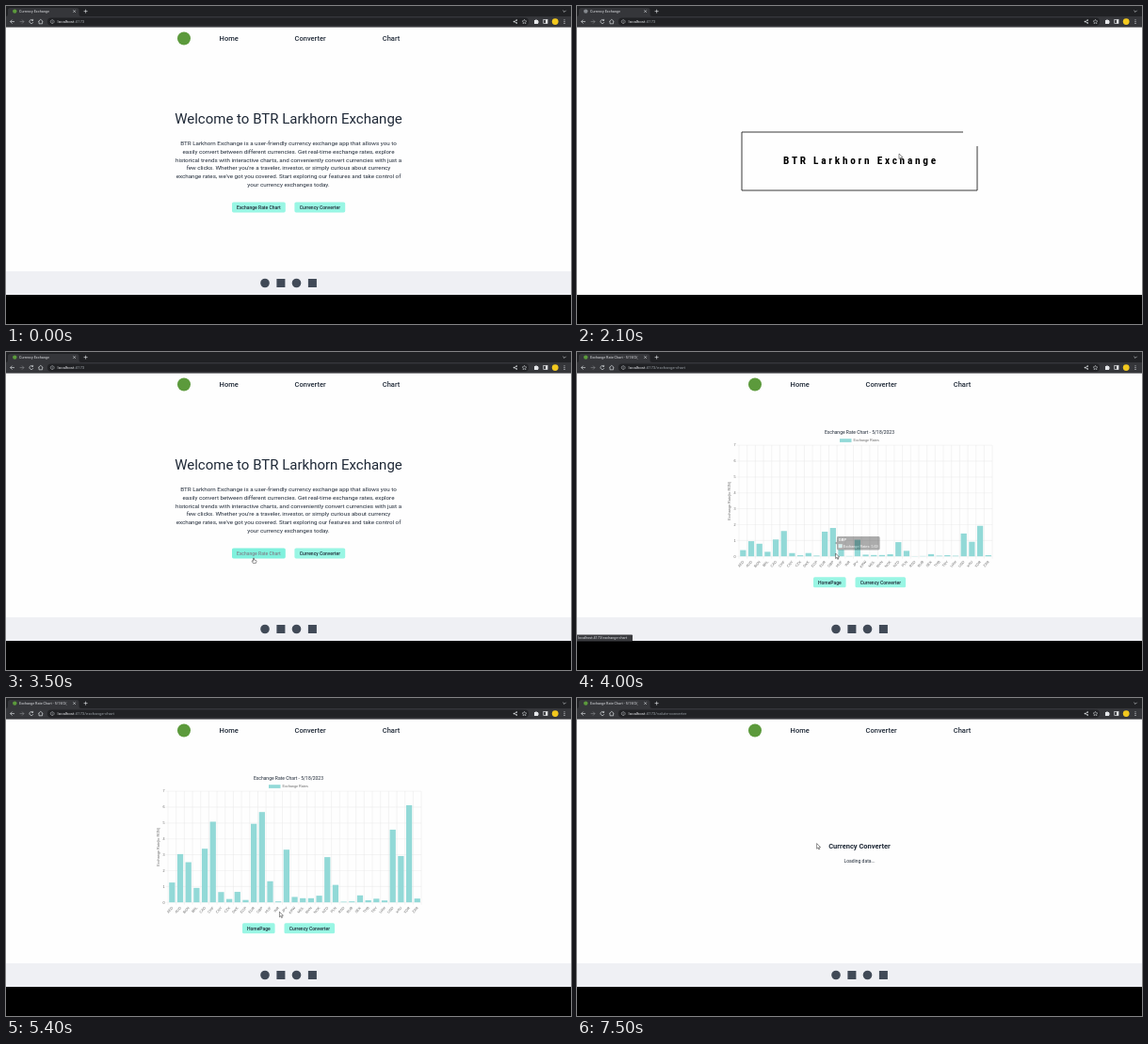
Animation, 600 px wide and 338 px high, one loop 8 s. Source, as an HTML page:

```html
<!DOCTYPE html>
<html lang="en">
<head>
<meta charset="utf-8">
<title>Currency Exchange</title>
<style>
html, body { margin: 0; width: 100%; height: 100%; overflow: hidden; background: #fff; }
svg { display: block; width: 600px; height: 338px; }
text { font-family: Roboto, sans-serif; fill: #1f2937; white-space: pre; }
.mid { text-anchor: middle; }
.nav { font-size: 7.5px; font-weight: 500; }
.body { font-size: 6.25px; }
.btn { font-size: 5px; font-weight: 500; }
.plot text { font-family: "Liberation Sans", Arial, sans-serif; font-size: 3.75px; fill: #666; }
.plot .title { font-family: Roboto, sans-serif; font-size: 5px; fill: #1f2937; }
.tip text { fill: #fff; }
.splash text { font: 700 11.25px "Roboto Condensed", Roboto, sans-serif; font-stretch: 75%; letter-spacing: 2.75px; fill: #000; }
.tab { font-size: 3.75px; fill: #dfe1e5; }
.url { font-size: 4.375px; fill: #e8eaed; }
.url tspan { fill: #9aa0a6; }
.line { fill: none; stroke: #d5d8dc; stroke-width: .7; }
</style>
</head>
<body>
<svg id="stage" viewBox="0 0 600 338"></svg>
<script>
const LOOP = 8000, STEP = 100;
const BRAND = "BTR Larkhorn Exchange";
const SPLASH_ON = 1900, HOME_BACK = 2700, CHART_ON = 3900, CONVERTER_ON = 6500;

const text = (x, y, s, cls = "", more = "") => `<text x="${x}" y="${y}" class="${cls}" ${more}>${s}</text>`;
const rect = (x, y, w, h, fill, more = "") => `<rect x="${x}" y="${y}" width="${w}" height="${h}" fill="${fill}" ${more}/>`;
const dot = (x, y, r, fill, more = "") => `<circle cx="${x}" cy="${y}" r="${r}" fill="${fill}" ${more}/>`;
const path = (d, more = 'class="line"') => `<path d="${d}" ${more}/>`;
const group = (id, inner, more = "") => `<g id="${id}" ${more}>${inner}</g>`;
const button = (id, x, y, w, s) => group(id,
  rect(x, y, w, 11, "#99f6e4", 'rx="1.6"') + text(x + w / 2, y + 7.2, s, "btn mid"));

// Browser window
function chrome() {
  return rect(0, 0, 600, 22.6, "#35363a") + rect(0, 0, 600, 11, "#202124")
    + path("M0 11 Q2 11 2 8.5 V4.5 Q2 2 4.5 2 H75 Q77.5 2 77.5 4.5 V8.5 Q77.5 11 80 11Z", 'fill="#35363a"')
    + dot(9.3, 5.6, 2.2, "#5c9a3c", 'id="favicon"')
    + text(14, 6.9, "", "tab", 'id="tabTitle"')
    + path("M71.4 4.4l2.4 2.4m0-2.4l-2.4 2.4M82.6 5.6h4M84.6 3.6v4M591.4 4.8l1.6 1.6 1.6-1.6")
    + rect(44, 12.6, 511, 8.2, "#202124", 'rx="4.1"')
    + path("M9 16.6H4.6m2-2l-2 2 2 2")
    + path("M14.6 16.6h4.4m-2-2l2 2-2 2", 'class="line" opacity=".45"')
    + path("M28.4 15.2a2 2 0 1 0 .4 2M28.6 13.9v1.6h-1.6M34.2 16.6l2.6-2.3 2.6 2.3M35 16.2v2.6h3.6v-2.6")
    + path("M49.2 14.7a1.9 1.9 0 1 0 .01 0M49.2 16.3v1.4M49.2 15.4v.4", 'class="line" style="stroke-width:.5"')
    + text(54.6, 18.1, "", "url", 'id="url"')
    + path("M542 15.4l-2.4 1.2 2.4 1.2", 'class="line"')
    + dot(542.2, 15.1, .8, "#d5d8dc") + dot(539.4, 16.6, .8, "#d5d8dc") + dot(542.2, 18.1, .8, "#d5d8dc")
    + path("M550.5 14.2l.7 1.6 1.7.2-1.3 1.1.4 1.7-1.5-.9-1.5.9.4-1.7-1.3-1.1 1.7-.2z", 'class="line" style="stroke-width:.5"')
    + path("M561 15h1.2a.8.8 0 0 1 1.6 0h1.3v1.2a.8.8 0 0 1 0 1.6v1.2H561z", 'fill="#e4e6e9"')
    + rect(570.8, 14.6, 4.2, 4, "none", 'stroke="#e4e6e9" stroke-width=".7"') + rect(573, 14.6, 2, 4, "#e4e6e9")
    + dot(583.2, 16.6, 3.4, "#f2c81e")
    + [14.8, 16.6, 18.4].map(y => dot(593, y, .55, "#d5d8dc")).join("");
}

function frame() {
  const ink = "#414a57";
  return dot(189, 34.5, 7, "#5c9a3c")
    + text(226.6, 36.8, "Home", "nav") + text(306.6, 36.8, "Converter", "nav") + text(399.8, 36.8, "Chart", "nav")
    + rect(0, 282, 600, 25, "#eff0f4")
    + dot(275, 294.5, 4.8, ink) + rect(287.4, 290, 9, 9, ink) + dot(308.5, 294.5, 4.8, ink) + rect(320.9, 290, 9, 9, ink);
}

function home() {
  const lines = [
    BRAND + " is a user-friendly currency exchange app that allows you to",
    "easily convert between different currencies. Get real-time exchange rates, explore",
    "historical trends with interactive charts, and conveniently convert currencies with just a",
    "few clicks. Whether you're a traveler, investor, or simply curious about currency",
    "exchange rates, we've got you covered. Start exploring our features and take control of",
    "your currency exchanges today."];
  return text(300, 125.2, "Welcome to " + BRAND, "mid", 'font-size="15"')
    + lines.map((s, i) => text(300, 148 + i * 8.75, s, "body mid")).join("")
    + button("toChart", 240, 208.4, 56.8, "Exchange Rate Chart")
    + button("toConverter", 306.4, 208.4, 53.8, "Currency Converter");
}

// Chart
const RATES = { AED: 1.25, AUD: 3.04, BGN: 2.53, BRL: .91, CAD: 3.38, CHF: 5.08, CNY: .65, CZK: .21, DKK: .66,
  EGP: .15, EUR: 4.95, GBP: 5.69, HUF: 1.33, INR: .06, JPY: 3.32, KRW: .34, MDL: .26, MXN: .26, NOK: .42,
  NZD: 2.85, PLN: 1.1, RSD: .04, RUB: .06, SEK: .44, THB: .13, TRY: .23, UAH: .12, USD: 4.58, XAU: 2.92,
  XDR: 6.12, ZAR: .24 };
const LEFT = 172, BASE = 217.2, UNIT = 16.87, SLOT = 8.68, RIGHT = 441;
const BAR = "#92d9d7";

function plot() {
  const codes = Object.keys(RATES);
  let grid = "", labels = "", bars = "";
  for (let v = 0; v <= 7; v++) {
    const y = BASE - v * UNIT;
    grid += `M${LEFT - 2.5} ${y}H${RIGHT}`;
    labels += text(168.6, y + 1.3, v, "", 'text-anchor="end"');
  }
  for (let i = 0; i <= codes.length; i++) grid += `M${LEFT + i * SLOT} ${BASE - 7 * UNIT}V${BASE + 2.5}`;
  codes.forEach((c, i) => {
    const x = LEFT + (i + .5) * SLOT;
    labels += text(0, 0, c, "", `text-anchor="end" transform="translate(${x + 1.2} 223.2) rotate(-48)"`);
    bars += rect(x - 3.12, BASE, 6.25, 0, BAR, `class="bar" data-v="${RATES[c]}"`);
  });
  return path(grid, 'fill="none" stroke="#e2e2e2" stroke-width=".4"') + labels + bars
    + text(300, 87, "Exchange Rate Chart - 5/18/2023", "title mid")
    + rect(279, 92.2, 12.5, 3.7, BAR) + text(293.4, 95.3, "Exchange Rates")
    + text(0, 0, "Exchange Rate(to RON)", "mid", 'transform="translate(162.8 158.3) rotate(-90)"');
}

const chart = () => group("plot", plot(), 'class="plot"')
  + button("toHome", 251, 239.3, 34.6, "HomePage")
  + button("chartToConverter", 295.5, 239.3, 53.6, "Currency Converter")
  + `<g class="plot">` + group("tip", path("M0 7l2-1.6V1.4Q2 0 3.4 0H46Q47.6 0 47.6 1.4V13Q47.6 14.4 46 14.4H3.4Q2 14.4 2 13V8.6Z", 'fill="#000" fill-opacity=".8"')
    + text(3.8, 5.2, "", "", 'id="tipName" font-weight="700"')
    + rect(3.9, 8.4, 3.6, 3.6, BAR, 'stroke="#fff" stroke-width=".3"')
    + text(8.8, 11.6, "", "", 'id="tipValue"'), 'class="tip"') + "</g>";

const converter = () => text(300, 160.1, "Currency Converter", "mid", 'font-size="7.5" font-weight="700"')
  + text(300, 175.4, "Loading data...", "mid", 'font-size="5"');

const splash = () => path("", 'id="outline" fill="none" stroke="#222" stroke-width=".9"')
  + text(301.4, 168.2, BRAND, "mid");

const ARROW = path("M0 0V5.6L1.3 4.4 2.2 6.4 3.1 6 2.2 4.1 4 4Z", 'id="arrow" fill="#fff" stroke="#222" stroke-width=".5"');
const HAND = path("M-.5.5Q0-.4.5.5V2.4L2.6 2.9Q3.2 3.1 3 4L2.4 5.8H-.7L-2 3.6Q-1.6 2.8-.5 3.7Z", 'id="hand" fill="#fff" stroke="#222" stroke-width=".5"');

stage.innerHTML = rect(0, 0, 600, 307, "#fefefe")
  + group("frame", frame()) + group("home", home()) + group("chart", chart())
  + group("converter", converter()) + group("splash", splash(), 'class="splash"')
  + chrome() + rect(0, 307, 600, 31, "#000")
  + group("status", rect(-1, 300.4, 60, 7, "#3a3b3f", 'rx=".8"') + text(1.2, 305.2, "", "tab", 'id="statusText"'))
  + group("cursor", ARROW + HAND);

// Motion
const $ = id => document.getElementById(id);
const show = (id, on) => $(id).setAttribute("visibility", on ? "inherit" : "hidden");
const clamp = v => Math.min(1, Math.max(0, v));
const smooth = p => p * p * (3 - 2 * p);
const within = (t, a, b) => t >= a && t < b;

// Rows are [time, ...values]
function along(rows, t, ease = smooth) {
  let i = rows.findIndex(r => r[0] > t);
  if (i < 0) i = rows.length;
  const a = rows[Math.max(0, i - 1)], b = rows[Math.min(i, rows.length - 1)];
  const p = b[0] > a[0] ? ease(clamp((t - a[0]) / (b[0] - a[0]))) : 0;
  return a.slice(1).map((v, k) => v + (b[k + 1] - v) * p);
}

const POINTER = [[1000, 300, 118], [1400, 100, 40], [1600, 26, 15], [1900, 26, 15], [2100, 342, 157],
  [2600, 330, 176], [3200, 275, 210], [3500, 263, 218.6], [3800, 263, 218.6], [4000, 274.6, 214],
  [4200, 262, 196], [4500, 219, 168], [4800, 257.4, 207], [5300, 288, 226], [5900, 321, 243],
  [6200, 323.6, 244.4], [6500, 323.6, 244.4], [6900, 280, 210], [7200, 214, 165.5], [7500, 254.6, 154.6]];
const TIP = [[3900, 274, 202, 0], [4000, 274, 196, .4], [4200, 274, 160, .8], [4400, 220, 142.4, .95],
  [4600, 220, 142.4, .85], [4800, 220, 142.4, .47], [5000, 220, 142.4, 0]];
const LIGHT = [153, 246, 228], DEEP = [94, 234, 212], INK = [31, 41, 55], WHITE = [255, 255, 255];
const blend = (a, b, p) => `rgb(${a.map((v, i) => Math.round(v + (b[i] - v) * p))})`;

function hover(id, p) {
  const [box, label] = $(id).children;
  box.setAttribute("fill", blend(LIGHT, DEEP, p));
  label.style.fill = blend(INK, WHITE, p);
}

function drawOutline(p) {
  const w = 250, h = 62, n = (w + h) * p;
  const up = Math.min(n, h), top = Math.max(0, n - h);
  const low = Math.min(n, w), side = Math.max(0, n - w);
  $("outline").setAttribute("d", `M175 196v${-up}h${top}M175 196h${low}v${-side}`);
}

function draw(t) {
  const loading = within(t, SPLASH_ON, HOME_BACK);
  const onChart = within(t, CHART_ON, CONVERTER_ON), onConverter = t >= CONVERTER_ON;
  show("splash", loading);
  show("frame", !loading);
  show("home", !loading && t < CHART_ON);
  show("chart", onChart);
  show("converter", onConverter);

  drawOutline(along([[1900, .5], [2000, .78], [2100, .952], [2200, 1]], t)[0]);
  hover("toChart", clamp((t - 3350) / 350));
  hover("chartToConverter", clamp((t - 5850) / 300));

  const grow = 1 - (1 - clamp((t - 3910) / 1000)) ** 4;
  document.querySelectorAll(".bar").forEach(bar => {
    const h = bar.dataset.v * UNIT * grow;
    bar.setAttribute("y", BASE - h);
    bar.setAttribute("height", h);
  });

  const [tx, ty, alpha] = along(TIP, t);
  const code = t < 4300 ? "GBP" : "CHF";
  $("tip").setAttribute("transform", `translate(${tx} ${ty})`);
  $("tip").setAttribute("opacity", alpha);
  $("tipName").textContent = code;
  $("tipValue").textContent = "Exchange Rates: " + RATES[code];

  const page = onConverter ? "/valute-converter" : onChart ? "/exchange-chart" : "";
  $("url").innerHTML = `localhost<tspan>:4173${page}</tspan>`;
  $("tabTitle").textContent = t < CHART_ON ? "Currency Exchange" : "Exchange Rate Chart - 5/18/2(";
  $("favicon").setAttribute("fill", loading ? "#85898e" : "#5c9a3c");

  show("status", within(t, 3700, 4500) || within(t, 6000, 6900));
  $("statusText").textContent = "localhost:4173/" + (t < 5000 ? "exchange-chart" : "valute-converter");

  const [x, y] = along(POINTER, t);
  const pointing = within(t, 3350, 3900) || within(t, 5850, 6500);
  $("cursor").setAttribute("transform", `translate(${x} ${y})`);
  show("cursor", t >= 1000);
  show("arrow", !pointing);
  show("hand", pointing);
}

const start = performance.now();
function tick() {
  const t = (performance.now() - start) % LOOP;
  draw(Math.min(7500, Math.floor(t / STEP) * STEP));
  requestAnimationFrame(tick);
}
tick();
</script>
</body>
</html>
```
